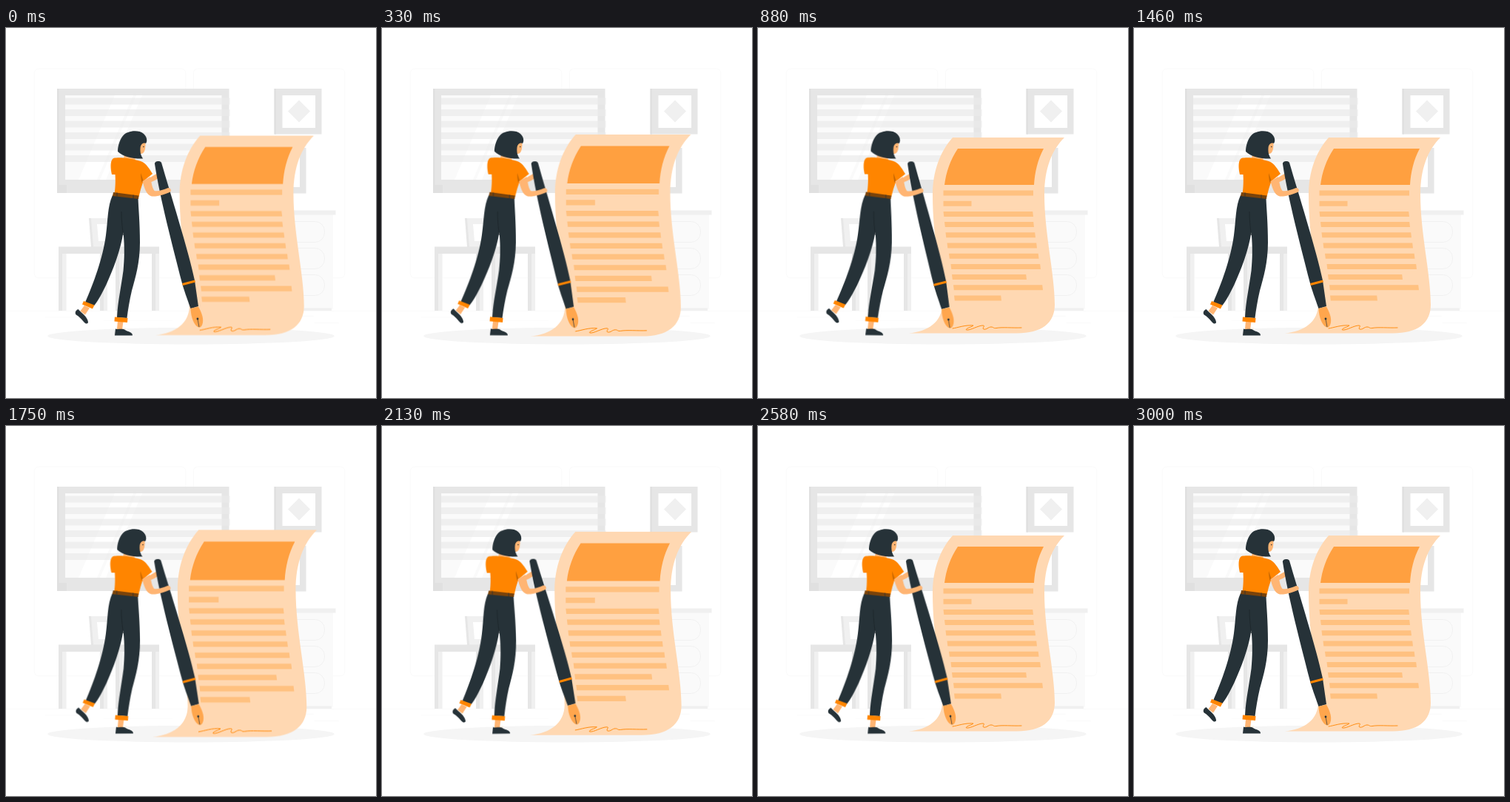
Recreate the animation shown at these times as an HTML page. Size 500x500 px, loop 3040 ms.

```html
<!DOCTYPE html>
<html lang="en">
<head>
<meta charset="utf-8">
<title>Signing a document</title>
<style>
html, body { margin: 0; width: 100%; height: 100%; overflow: hidden; background: #fff; }
svg { display: block; width: 100vw; height: 100vh; }

.paper, .writer { animation: 3040ms linear infinite; }
.paper { transform-origin: 309px 280px; animation-name: heartbeat; }
.writer { transform-origin: 180px 278px; animation-name: sway; }

/* two double beats, then a rest */
@keyframes heartbeat {
  0% { transform: scale(1.018); }
  4.046%, 23.783%, 53.388%, 73.125% { transform: scale(1.1); }
  13.914%, 18.849%, 28.717%, 48.454%, 63.257%, 68.191%, 78.059%, 100% { transform: scale(1); }
}
@keyframes sway {
  0% { transform: rotate(.036deg); }
  23.783% { transform: rotate(1deg); }
  73.125% { transform: rotate(-1deg); }
  97.796%, 100% { transform: rotate(0deg); }
}

.dark { fill: #263238; }
.orange { fill: #ff8500; }
.skin { fill: #ffb573; }
.g0 { fill: #e0e0e0; }
.g1 { fill: #e6e6e6; }
.g2 { fill: #f0f0f0; }
.g3 { fill: #f5f5f5; }
.g4 { fill: #fafafa; }
.white { fill: #fff; }
.hair-line { fill: none; stroke: #ebebeb; stroke-width: .25; }
</style>
</head>
<body>
<svg viewBox="0 0 500 500">
  <g class="room">
    <g class="hair-line">
      <rect x="38.3" y="55.1" width="204.4" height="282.6" rx="5.6"/>
      <rect x="253.4" y="55.1" width="204.4" height="282.6" rx="5.6"/>
      <path d="M0 382.5H500M416.8 398.6h33.1M322.5 401.3h8.7M396.6 389.3h19.2M52.5 391h43.2M104.6 391h6.3M131.5 395.2h93.7"/>
    </g>

    <g class="window">
      <rect class="g1" x="69" y="82" width="232.5" height="141"/>
      <path class="g0" d="M69 82h2.5v130H82v11H69Z"/>
      <rect class="g4" x="80" y="91" width="211.5" height="114"/>
      <path class="white" d="M147 91h25L123 205H98ZM176 91h8L135 205h-8Z"/>
      <g id="slats" fill="#ebebeb" opacity=".68"></g>
    </g>

    <g id="frame">
      <rect class="g1" x="362.5" y="82" width="64" height="61.5"/>
      <rect class="g0" x="362.5" y="82" width="2.5" height="61.5"/>
      <rect class="white" x="373.5" y="91" width="44.5" height="44"/>
      <path class="g2" d="M396 97.5l15 15-15 15-15-15Z"/>
    </g>
    <use href="#frame" x="-21" y="80"/>

    <g class="cabinet">
      <rect class="g4" x="330" y="252" width="112" height="128"/>
      <rect class="g2" x="326" y="246.5" width="119.5" height="6"/>
      <rect class="g2" x="332" y="378.5" width="108" height="3.5"/>
      <g fill="none" stroke="#ebebeb" stroke-width=".6">
        <rect x="340" y="261.5" width="90.5" height="28" rx="13"/>
        <rect x="340" y="297.5" width="90.5" height="28" rx="13"/>
        <rect x="340" y="333.5" width="90.5" height="28" rx="13"/>
      </g>
    </g>

    <g class="table">
      <path class="g1" d="M112 257h28l6 39h-31Z"/>
      <path class="g2" d="M115 257h25l6 39h-28Z"/>
      <path class="white" d="M123 265h16l4 23h-18Z"/>
      <path class="g2" d="M71 305h10.500v77H71ZM127 305h10v77h-10ZM148 305h10v77h-10ZM197 305h10v77h-10Z"/>
      <path class="g1" d="M71 305h5v77h-5ZM127 305h5v77h-5ZM148 305h5v77h-5ZM197 305h5v77h-5Z"/>
      <rect class="g1" x="71" y="295.500" width="136" height="9.500"/>
    </g>
  </g>

  <ellipse class="g3" cx="250" cy="416.2" rx="193.900" ry="11.300"/>

  <g class="paper">
    <path fill="#ffd8b2" d="M263 148H414C397 165 387 190 387 225C387 278 401 332 401 374C401 399 383 412.500 350 412.500H204C230 410 249 397 249 373C249 338 236 288 236 225C236 194 246 167 263 148Z"/>
    <path fill="#ffa040" d="M270 163H386C378 178 374 195 373 212H252C254 195 260 178 270 163Z"/>
    <g id="text" fill="#ffc180"></g>
    <path fill="none" stroke="#ff8500" stroke-width=".9" stroke-linecap="round" stroke-linejoin="round" d="M263 406C270 405 280 401 291 402C289 404 280 406 281.500 408C287 409 297 402 304 402C308 402 302 406 305 407C309 408 311 404 315 404C319 404 317 406 322 405.500C330 404 344 405.500 356 405"/>
  </g>

  <g class="writer">
    <path class="skin" d="M192 205C197 200 201 198 206 196L208 202C203 205 199 207 194 209Z"/>

    <g class="feet">
      <path class="skin" d="M106 375l7 3.500-6 9-6.500-5ZM151 396l7.500 1-1.500 11-7-1Z"/>
      <path class="dark" d="M97.500 380C102 385 107 388 109.500 393C111.500 397 112 400 108 399.500C104 397 102 392 95.500 388C92.500 386 93.500 382 97.500 380Z"/>
      <path class="dark" d="M148 406.500C152 408 157 405.500 161 408C165 411 171 410.500 171 415.500H147Z"/>
      <path fill="none" stroke="#ffe7cc" stroke-width=".8" d="M106 388l3-2M158 406.500l4-1"/>
    </g>

    <path class="dark" d="M144 226L178.500 230C179 244 181 264 181 290C181 317 175 337 170 355C167 368 165 380 163.500 392L150 391C151 370 156 348 158.500 328C160 312 160.500 296 158.500 276C155 300 145 326 135 348C129 360 125 368 118.500 376L107 371C118 346 131 311 135 280C138 258 137 241 144 226Z"/>
    <path fill="none" stroke="#1a2327" stroke-width=".7" d="M156 248C156 260 157 268 158.500 280"/>
    <path class="orange" d="M105 369l14.500 5.500-2.500 5-14-6ZM147 390.500l17.500 1.500-.5 6-17.500-1.500Z"/>

    <path class="skin" d="M160 172h14l1 8-17-2Z"/>
    <path class="orange" d="M149 175.500C158 174.500 171 177 182 180C190 183 194 191 198 197L185.500 207C183 214 181 221 179.500 228L146.500 224.500C148 214 148 206 147.500 198H143C141 190 141 182 143 178.500C144 176 146 175.500 149 175.500Z"/>
    <path fill="#c96800" d="M182 196C182 201 182.500 205 183.500 209L185.500 206Z"/>
    <path fill="#7a430a" d="M145 222l34.500 4.500-.5 4.500-35-4Z"/>
    <path fill="none" stroke="#263238" stroke-width=".8" d="M150 222.500v5M172 225.500v5"/>

    <g class="head">
      <path class="skin" d="M180 157C183 153 188.500 153 188.500 157L188 163C187 168 185 170.500 181 170Z"/>
      <path class="dark" d="M165 141C171 138.500 181 138.500 186 143C190 146.500 191.500 152 189 156C185 154.500 182 157 181.500 162C181 168 182 172 185 176.500C172 177 158 174 151 167C151 157 156 143 165 141Z"/>
      <circle class="dark" cx="185.800" cy="160.500" r=".8"/>
    </g>

    <g class="pen">
      <path class="dark" d="M201 184C200 180 208 178.500 210 182C221 220 247 302 255 341L260 376L249.500 379C245 366 240 353 237.500 343C225 294 208 230 201 184Z"/>
      <path fill="none" stroke="#ff8500" stroke-width="3" d="M238.500 346.500L255.500 342"/>
      <path fill="#ffa64d" d="M249.500 379L260 376.500C264 384 267 391 266 398C265 403 263 405 260.500 404.500C254 402 250 391 249.500 379Z"/>
      <circle class="dark" cx="259" cy="393" r="1.400"/>
      <path fill="none" stroke="#263238" stroke-width=".7" d="M259 393l2 11"/>
    </g>

    <path class="skin" d="M184.500 207C187 217 190 226 197 227.500C206 228 216 224 222 221.500C224 219 222 216 219 216C212 219 205 221 200.500 220C197 215 196.500 208 195 201Z"/>
  </g>
</svg>
<script>
const addPath = (id, d) => {
  const path = document.createElementNS("http://www.w3.org/2000/svg", "path");
  path.setAttribute("d", d);
  document.getElementById(id).append(path);
};

for (let i = 0; i < 6; i++) addPath("slats", `M80 ${94.5 + i * 15.5}H302.5v9H80Z`);

// left and right end of each line of writing
const lines = [
  [250.5, 372], [250.5, 288.5], [250.5, 372], [252, 373], [253.5, 375], [255.5, 377],
  [258, 379.5], [260.5, 382], [262, 363], [264, 385], [265, 329]
];
lines.forEach(([left, right], i) => {
  const y = 219.5 + i * 14.2;
  const lean = i < 2 ? 0 : 0.8;
  addPath("text", `M${left} ${y}H${right - lean}l${lean} 7H${left + lean}Z`);
});
</script>
</body>
</html>
```
